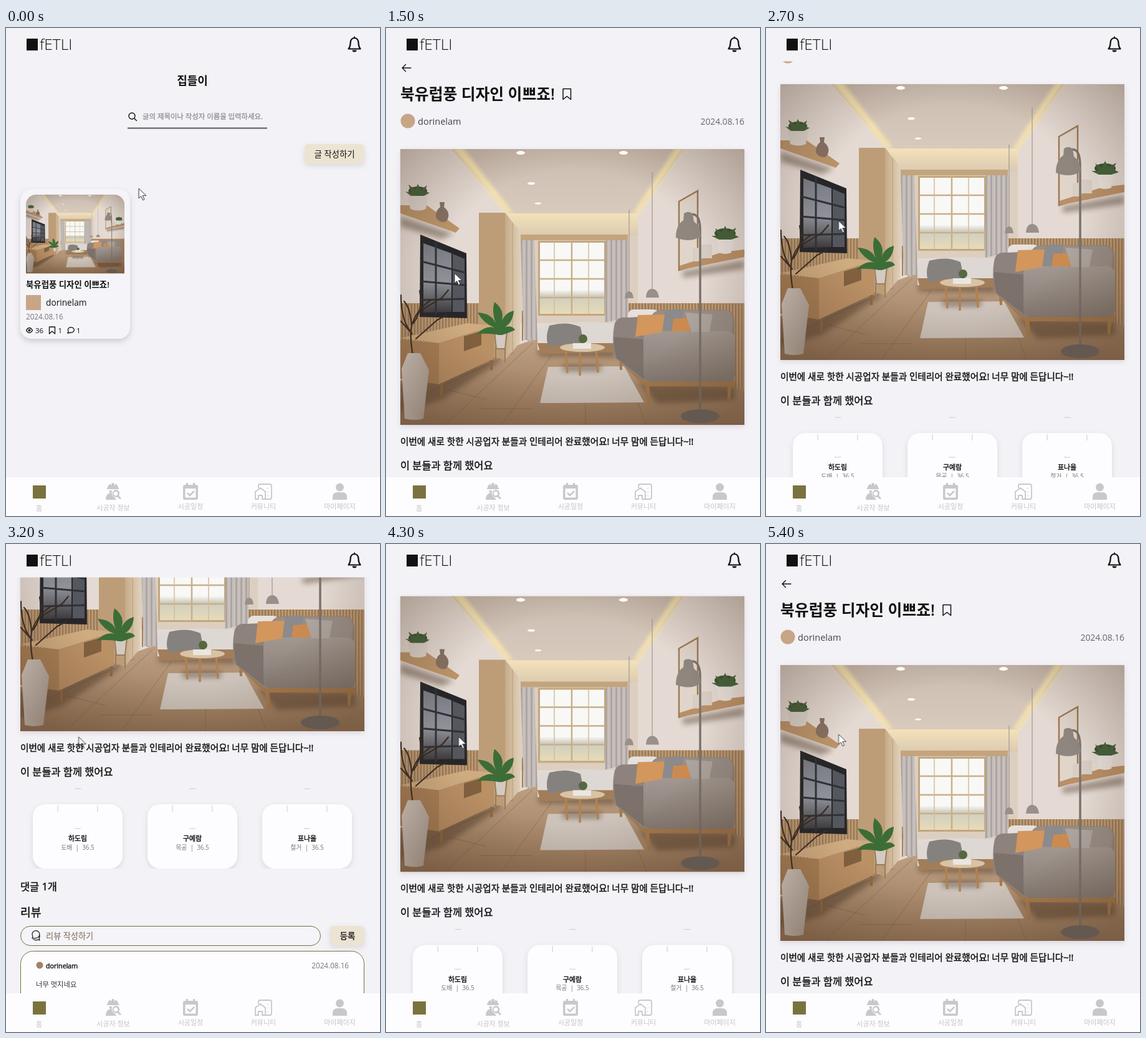
An HTML page for the animation above (5.5 s loop, 600 by 782 pixels).

```html
<!DOCTYPE html>
<html lang="ko">
<head>
<meta charset="utf-8">
<title>집들이</title>
<style>
  html, body { margin: 0; width: 100%; height: 100%; overflow: hidden; background: #f3f2f6; }
  svg.stage { display: block; width: 600px; height: 782px; }
  text { font-family: "Open Sans", "Noto Sans CJK KR", "Noto Sans CJK", sans-serif; fill: #111; }
  .mid { text-anchor: middle; }
  .end { text-anchor: end; }
  .m { stroke: #111; stroke-width: .4; }
  .b { font-weight: 600; }
  .grey { fill: #77767a; }
  .line { fill: none; stroke: #111; stroke-linecap: round; stroke-linejoin: round; }
  .nav text { font-size: 11px; fill: #c3c2c6; text-anchor: middle; }
  .nav .icon { fill: #c8c7cb; }
  .soft { filter: drop-shadow(0 3px 4px rgba(60, 50, 70, .13)); }
  .glow { filter: blur(3px); }
  .shade { fill: #3f2a1a; opacity: .42; filter: blur(4px); }

  .list, .detail, .blink, .scroll, .cursor, .arrow { animation: 5.5s step-end infinite; }
  .list { animation-name: list; }
  .detail { animation-name: detail; }
  .blink { animation-name: blink; }
  .scroll { animation-name: scroll; }
  .cursor { animation-name: cursor; }
  .arrow { animation-name: arrow; }

  /* one tick is 100 ms; steps(n, start) jumps at once, then every tick */
  @keyframes list { 0% { visibility: visible } 16.36%, 100% { visibility: hidden } }
  @keyframes detail { 0% { visibility: hidden } 18.18%, 100% { visibility: visible } }
  @keyframes blink { 0% { visibility: visible } 16.36% { visibility: hidden } 18.18%, 100% { visibility: visible } }
  @keyframes arrow { 0% { fill-opacity: 0 } 1.81% { fill-opacity: 1 } 58.18% { fill-opacity: 0 } 72.72%, 100% { fill-opacity: 1 } }
  @keyframes scroll {
    0% { transform: translateY(0) }
    45.45% { transform: translateY(0); animation-timing-function: steps(3, start) }
    50.9% { transform: translateY(-104px); animation-timing-function: steps(5, start) }
    59.99% { transform: translateY(-336px) }
    72.72% { transform: translateY(-336px); animation-timing-function: steps(4, start) }
    79.99% { transform: translateY(-110.5px); animation-timing-function: steps(2, start) }
    83.63%, 100% { transform: translateY(0) }
  }
  @keyframes cursor {
    0% { transform: translate(212px, 256px) }
    7.27% { transform: translate(212px, 256px); animation-timing-function: steps(5, start) }
    16.36% { transform: translate(144px, 301px) }
    18.18% { transform: translate(144px, 301px); animation-timing-function: steps(6, start) }
    29.09% { transform: translate(109px, 392px) }
    36.36% { transform: translate(109px, 392px); animation-timing-function: steps(4, start) }
    43.63% { transform: translate(115.5px, 308px) }
    83.63% { transform: translate(115.5px, 308px); animation-timing-function: steps(4, start) }
    90.9%, 100% { transform: translate(115.5px, 304px) }
  }
</style>
</head>
<body>
<svg class="stage" viewBox="0 0 600 782">
  <defs>
    <linearGradient id="ceil" x2="0" y2="1"><stop stop-color="#cabcb0"/><stop offset="1" stop-color="#d8cabd"/></linearGradient>
    <linearGradient id="cove" x2="0" y2="1"><stop stop-color="#f3e2b8"/><stop offset="1" stop-color="#dccab2"/></linearGradient>
    <linearGradient id="floor" x2="0" y2="1"><stop stop-color="#bd9f83"/><stop offset="1" stop-color="#977759"/></linearGradient>
    <linearGradient id="side"><stop stop-color="#c6ab88"/><stop offset="1" stop-color="#dfcfb8"/></linearGradient>
    <linearGradient id="view" x2="0" y2="1"><stop offset=".66" stop-color="#f8f8f7"/><stop offset=".75" stop-color="#cfcdc0"/><stop offset="1" stop-color="#e6dcb8"/></linearGradient>
    <linearGradient id="screen" x2="0" y2="1"><stop stop-color="#777a82"/><stop offset=".55" stop-color="#8f929a"/><stop offset="1" stop-color="#3d3b3d"/></linearGradient>
    <linearGradient id="sofa" x2="0" y2="1"><stop stop-color="#a29891"/><stop offset="1" stop-color="#857b74"/></linearGradient>
    <linearGradient id="vase"><stop stop-color="#ddd4cd"/><stop offset="1" stop-color="#b6aaa0"/></linearGradient>
    <radialGradient id="dim" cx=".5" cy=".45" r=".68"><stop offset=".55" stop-color="#4a3220" stop-opacity="0"/><stop offset="1" stop-color="#4a3220" stop-opacity=".36"/></radialGradient>
    <pattern id="slats" width="5" height="10" patternUnits="userSpaceOnUse"><rect width="5" height="10" fill="#b99874"/><rect width="2" height="10" fill="#997752"/></pattern>
    <pattern id="folds" width="8" height="10" patternUnits="userSpaceOnUse"><rect width="8" height="10" fill="#c6bfbb"/><rect width="3" height="10" fill="#aca5a1"/></pattern>
    <clipPath id="top"><rect x="32" y="267" width="158" height="160" rx="16"/></clipPath>
    <clipPath id="row"><rect y="700" width="600" height="156"/></clipPath>

    <symbol id="room" viewBox="23 194 552 442">
      <rect x="23" y="194" width="552" height="442" fill="#e4dad3"/>
      <path d="M105 194H478L404 297H196z" fill="url(#ceil)"/>
      <g class="glow" fill="#f6e3b0"><path d="M104 190h18l82 107h-11zM466 190h14l-76 110-7-4z"/></g>
      <path d="M196 297h208v36H196z" fill="url(#cove)"/>
      <path d="M215 333h189v140H215z" fill="#ddcfc0"/>
      <path d="M23 441h126v70H23zM374 441h201v150H374z" fill="url(#slats)"/>
      <path d="M23 565 200 512l40-14h135l200 84v54H23z" fill="url(#floor)"/>
      <path d="M235 505 95 636M265 525 185 636M320 601v35M400 590l18 46M205 520 23 605M100 580l60 15M150 610h85" fill="none" stroke="#7d5d40" stroke-opacity=".55"/>
      <path class="shade" d="M23 570l150-40 14 2-98 64-66 20zM243 514l125 2v12l-122-2zM405 568l155 6v22l-125 6z"/>

      <path d="M149 296h42v236l-42-12z" fill="#bd9d78"/>
      <path d="M191 296l24 30v178l-24 28z" fill="url(#side)"/>
      <path d="M203 312v205" stroke="#b99a74"/>
      <path d="M216 331h172v9H216z" fill="#c3a47d"/>
      <path d="M218 453h12v48h-3v-30h-7v30h-2z" fill="#a87d50"/>
      <path d="M244 341h109v120H244z" fill="#c3a67e"/>
      <path d="M247 344h103v114H247z" fill="url(#view)"/>
      <path d="M298 342v118M247 372h103M247 402h103M247 432h103" stroke="#c9ae88" stroke-width="2.500"/>
      <path d="M270 344v114M325 344v114" stroke="#d3bc9a" stroke-width="1.500"/>
      <path d="M216 340h22l5 160h-22zM353 340h36v124l-38 8z" fill="url(#folds)"/>

      <path d="M243 482q30-16 130-8v42H243z" fill="#ded8d4"/>
      <path d="M243 505h125v14l-120 4z" fill="#a27d5a"/>
      <path d="M262 477q28-8 50 2l6 29q-30-6-56 4-8-14 0-35z" fill="#85817f"/>
      <rect x="388" y="451" width="50" height="20" rx="9" fill="#e6e1de"/>

      <path d="M260 543 382 542l32 58-167 1z" fill="#cdc3ba"/>
      <path d="M372 520l43 46h145v8H415l-43-42zM415 570h7l3 33h-5zM548 570h7l-3 25h-4zM374 530h5v18h-4z" fill="#a67a4c"/>
      <path d="M366 478q2-16 20-14l40-2q3-10 20-10h96q16 1 17 18v96h-146l-46-38q-5-30-1-50z" fill="#8d837c"/>
      <path d="M428 462q3-9 16-9h98q16 1 14 18l-2 20-126 3z" fill="#988e87"/>
      <path d="M366 495l48 4v64l-44-34q-5-17-4-34z" fill="#7c726b"/>
      <rect x="413" y="486" width="147" height="81" rx="13" fill="url(#sofa)"/>
      <path d="M447 455q16-7 30-3l-5 33h-28z" fill="#8b8a8c"/>
      <path d="M404 460 447 459l-4 28-43 8z" fill="#d3965c"/>
      <path d="M461 466l30-2-3 22h-30z" fill="#cb8b50"/>
      <path d="M480 456l44 3-5 28h-29z" fill="#aca49e"/>

      <path class="shade" d="M283 540h62v10h-62z"/>
      <path d="M288 513l3 40M311 518v39M337 513l3 39" stroke="#b08250" stroke-width="3.500"/>
      <ellipse cx="315" cy="512" rx="36" ry="7" fill="#d8c3a6"/>
      <path d="M300 505h29v9h-29z" fill="#ece6e0"/>
      <circle cx="316" cy="498" r="7" fill="#55683f"/>

      <path d="M23 497 130 473l43 4-88 28z" fill="#cfab80"/>
      <path d="M23 500l62 5v66l-62-9z" fill="#a87f55"/>
      <path d="M85 505l88-27v52l-88 41z" fill="#ba9065"/>
      <path d="M125 494l28-8v22l-28 10z" fill="#81603f"/>
      <path d="M89 569v21M169 532v16" stroke="#8e673f" stroke-width="4"/>
      <path d="M55 331 129 361l1 104-76-2z" fill="#262629"/>
      <path d="M60 345 105 361v94l-45 1z" fill="url(#screen)"/>
      <path d="M107 362l19 8v85h-19z" fill="#55575e"/>
      <path d="M57 374l70 18M57 406l70 6M57 436l70-2M80 342v118" stroke="#303136" stroke-width="3"/>

      <path class="shade" d="M23 302l86 28-20 8-66-20zM475 390l100-18v14l-98 14z"/>
      <path d="M23 284h42l53 37-6 7-89-31z" fill="#ba9369"/>
      <path d="M34 264h34l-4 26q-12 5-25 0z" fill="#dbd3cc"/>
      <ellipse cx="51" cy="261" rx="15" ry="7" fill="#3b5033"/>
      <path d="M31 262l10 2-5-13 11 8 4-9 5 9 10-7-4 10 8 2-9 5H40z" fill="#43603a"/>
      <path d="M86 279h8l-1 8q9 7 7 16-2 9-9 8-12-3-11-12 1-8 7-12z" fill="#857061"/>
      <path d="M174 486h20l-3 28h-14zM176 512v24M191 512v24" fill="#d3cac1" stroke="#9a7c5c" stroke-width="2"/>
      <path d="M182 492q-24-4-37-1 14-15 29-11-18-7-27-24 22 1 29 17-7-19-2-34 18 14 11 32 6-15 20-18-1 18-14 26 12-3 16 5-11 5-21 8z" fill="#3c6d36"/>
      <g class="line" style="stroke:#3a2c25">
        <path d="M43 524q-6-35-1-50 8-24 30-38M42 490q-18-20-18-62M41 478q-2-30-12-40M44 473q16-22 10-52M60 450l30-18 10-12M24 470l18 20M48 498l34-30 15-8" stroke-width="2.200"/>
      </g>
      <path d="M35 521h20l14 27-9 78q-14 4-30 0l-5-80z" fill="url(#vase)"/>

      <path d="M470 278l30-17v118l-30 9z" fill="#e0d5cb" stroke="#9c7853" stroke-width="2.500"/>
      <path d="M471 381 540 359l35-4v12L471 388z" fill="#b88f66"/>
      <path d="M492 352h14v22h-14zM506 347h17v22h-17z" fill="#d9cec4"/>
      <path d="M530 336h28l-4 24q-10 4-20 0z" fill="#e6e0da"/>
      <ellipse cx="544" cy="329" rx="17" ry="8" fill="#3a5232"/>
      <path d="M522 333l12 0-6-12 11 7 5-11 5 10 13-7-5 10 9 5-12 4h-20z" fill="#42613a"/>
      <path d="M427 231v190M390 291v134" stroke="#a1978f" stroke-width="1.200"/>
      <path d="M417 432q1-14 10-14t11 14zM383 433q1-11 7-11t7 11z" fill="#989089"/>
      <path d="M484 300q20-8 20 24v294" fill="none" stroke="#7b726c" stroke-width="3.500"/>
      <path d="M478 297q8-5 14 1l2 12q11 8 11 24-17 11-40 2 0-20 12-28z" fill="#8f8680"/>
      <rect x="23" y="194" width="552" height="442" fill="url(#dim)"/>
      <ellipse cx="504" cy="622" rx="31" ry="11" fill="#645951"/>
      <g fill="#fffdf6"><ellipse cx="216" cy="200" rx="7" ry="3"/><ellipse cx="381" cy="200" rx="7" ry="3"/><ellipse cx="233" cy="249" rx="6" ry="2"/><ellipse cx="244" cy="281" rx="5" ry="1.500"/></g>
    </symbol>

    <g id="worker">
      <rect class="soft" x="43" y="753" width="144" height="103" rx="20" fill="#fdfcfe"/>
      <circle cx="115" cy="760" r="32" fill="none" stroke="#c9c8cc" stroke-dasharray="10 40.27" stroke-dashoffset="5"/>
    </g>
    <path id="mark" d="M0 0h9v11L4.500 7 0 11z"/>
  </defs>

  <rect width="600" height="782" fill="#f3f2f6"/>

  <g class="list">
    <text class="mid b" x="299" y="91" font-size="18">집들이</text>
    <g class="line" stroke-width="1.400"><circle cx="202" cy="141" r="5"/><path d="M206 145l3.500 3.500"/></g>
    <text x="219" y="145.500" font-size="11.400" style="fill:#8d8c90;stroke:#8d8c90;stroke-width:.25">글의 제목이나 작성자 이름을 입력하세요.</text>
    <path d="M195 160.500h224" stroke="#59585c" stroke-width="2"/>
    <rect class="soft" x="479" y="186" width="96" height="32" rx="6" fill="#ece4d3"/>
    <text class="mid" x="527" y="207" font-size="13.400">글 작성하기</text>

    <rect x="23" y="258" width="176" height="240" rx="18" fill="#f5f4f8" style="filter:drop-shadow(0 4px 5px rgba(60,50,70,.2))"/>
    <g clip-path="url(#top)"><use href="#room" x="32" y="267" width="158" height="126.500"/></g>
    <text class="b" x="32" y="415.500" font-size="13.400">북유럽풍 디자인 이쁘죠!</text>
    <rect x="32" y="428" width="24" height="24" fill="#c7a587"/>
    <text x="64" y="445" font-size="13.700">dorinelam</text>
    <text class="grey" x="32" y="466.500" font-size="11.700">2024.08.16</text>
    <path class="line" d="M32.500 484.500q5-8 10 0-5 8-10 0z" stroke-width="1.400"/>
    <circle cx="37.500" cy="484.500" r="2" fill="#111"/>
    <use href="#mark" class="line" x="69.500" y="479" stroke-width="1.300"/>
    <path class="line" d="M99 489l1-3a5 4.300 0 1 1 3 2z" stroke-width="1.300"/>
    <g font-size="11.500"><text x="47" y="488.500">36</text><text x="83.500" y="488.500">1</text><text x="113" y="488.500">1</text></g>
  </g>

  <g class="detail">
    <g class="scroll">
      <path class="line" d="M40 64H26M31.500 58.500 26 64l5.500 5.500" stroke-width="1.400"/>
      <text class="b" x="23" y="115" font-size="24.800">북유럽풍 디자인 이쁘죠!</text>
      <path class="line" d="M284 97.500h12.500v17l-6.200-5-6.300 5z" stroke-width="1.500"/>
      <circle cx="35" cy="149" r="11.500" fill="#c7a587"/>
      <text x="51" y="155" font-size="14.500" style="fill:#444347">dorinelam</text>
      <text class="end" x="575" y="155" font-size="13.800" style="fill:#66656a">2024.08.16</text>
      <rect class="soft" x="23" y="194" width="552" height="442" fill="#e6ddd6"/>
      <use href="#room" x="23" y="194" width="552" height="442"/>
      <text class="m" x="23" y="667.500" font-size="14.600">이번에 새로 핫한 시공업자 분들과 인테리어 완료했어요! 너무 맘에 든답니다~!!</text>
      <text class="m" x="23" y="706.500" font-size="16.400">이 분들과 함께 했어요</text>

      <g clip-path="url(#row)"><use href="#worker"/><use href="#worker" x="184"/><use href="#worker" x="368"/></g>
      <g class="mid m" font-size="10.900"><text x="115" y="812">하도림</text><text x="299" y="812">구예람</text><text x="483" y="812">표나울</text></g>
      <g class="mid" font-size="9.900">
        <text class="grey" x="115" y="825.500">도배&nbsp;&nbsp;|&nbsp;&nbsp;36.5</text><text class="grey" x="299" y="825.500">목공&nbsp;&nbsp;|&nbsp;&nbsp;36.5</text><text class="grey" x="483" y="825.500">철거&nbsp;&nbsp;|&nbsp;&nbsp;36.5</text>
      </g>

      <text class="m" x="23" y="890.500" font-size="16.400">댓글 1개</text>
      <text class="m" x="23" y="933" font-size="18.200">리뷰</text>
      <rect x="23.500" y="948.500" width="481" height="31" rx="15.500" fill="#f5f4f8" stroke="#77703f"/>
      <path class="line" d="M42 968l1-3a6 6 0 1 1 4 2.500zM44 969.500q4 2.500 7 .5l3 1-1-3q2-3 .5-6" stroke-width="1.200"/>
      <text x="64" y="969" font-size="13.200" style="fill:#7c6650">리뷰 작성하기</text>
      <rect class="soft" x="520" y="948" width="55" height="32" rx="6" fill="#ece4d3"/>
      <text class="mid m" x="548" y="969" font-size="13.200">등록</text>
      <rect x="23.500" y="988.500" width="551" height="110" rx="20" fill="#fdfcfe" stroke="#77703f"/>
      <circle cx="54" cy="1011" r="5.500" fill="#a28267"/>
      <text class="m" x="64" y="1016" font-size="10.700">dorinelam</text>
      <text class="grey end" x="550" y="1016" font-size="11.700">2024.08.16</text>
      <text x="48" y="1045.500" font-size="11.300" style="fill:#333">너무 멋지네요</text>
    </g>
  </g>

  <rect width="600" height="53.500" fill="#f3f2f6"/>
  <g class="blink">
    <rect x="33" y="17" width="18" height="19" fill="#111"/>
    <text x="54" y="35" font-size="24.500" font-weight="300">fETLI</text>
  </g>
  <path class="line" d="M549.500 33.500q3-4 3-9 0-8 6.500-8.500 6.500.5 6.500 8.500 0 5 3 9zM559 15.500v-1" stroke-width="2.200"/>
  <path d="M555.500 35.500h7a3.500 3 0 0 1-7 0z" fill="#111"/>

  <g class="nav">
    <rect y="720" width="600" height="62" fill="#fdfcfe"/>
    <rect class="blink" x="43" y="733" width="21" height="21" fill="#7a733f"/>
    <g class="icon">
      <path d="M163 737q0-5 5-6.500v4l2-5.500h3l2 5.500v-4q5 1.500 5 6.500h1v2h-19v-2zM160 756q0-9 7-11l-2-4h5q-2 8 5 12l2 3z"/>
      <path d="M176 740a6 6 0 0 1 5 9.500l4 4-2 2-4-4a6 6 0 1 1-3-11.500zm0 2.500a3.500 3.500 0 1 0 .1 0z"/>
      <path fill-rule="evenodd" d="M289 729h3v3h8v-3h3v3h2q3 0 3 3v18q0 3-3 3h-18q-3 0-3-3v-18q0-3 3-3h2zM287.500 738v14.500h17V738z"/>
      <path d="M291 745l4 4 7-7" fill="none" stroke="#c8c7cb" stroke-width="2.500"/>
      <path d="M400 755v-12l8-6 8 6v12h-5v-6h-6v6zM405 737v-3q0-3 3-3h15q3 0 3 3v18q0 3-3 3h-7M420 737v1M420 743v1M420 749v1" fill="none" stroke="#c8c7cb" stroke-width="1.800" stroke-linejoin="round"/>
      <circle cx="535.500" cy="736" r="6.500"/>
      <path d="M524 756v-4q0-8 8-8h7q8 0 8 8v4z"/>
    </g>
    <text x="53" y="774">홈</text><text x="172" y="773">시공자 정보</text><text x="296" y="771">시공일정</text><text x="413" y="771">커뮤니티</text><text x="535.500" y="771">마이페이지</text>
  </g>

  <g class="cursor">
    <path class="arrow" d="M1 1v16l3.700-3.400 2.800 6.200 2.600-1.100-2.700-6.100H13z" fill="#fff" stroke="#2b2b30" stroke-width=".9"/>
  </g>
</svg>
</body>
</html>
```
